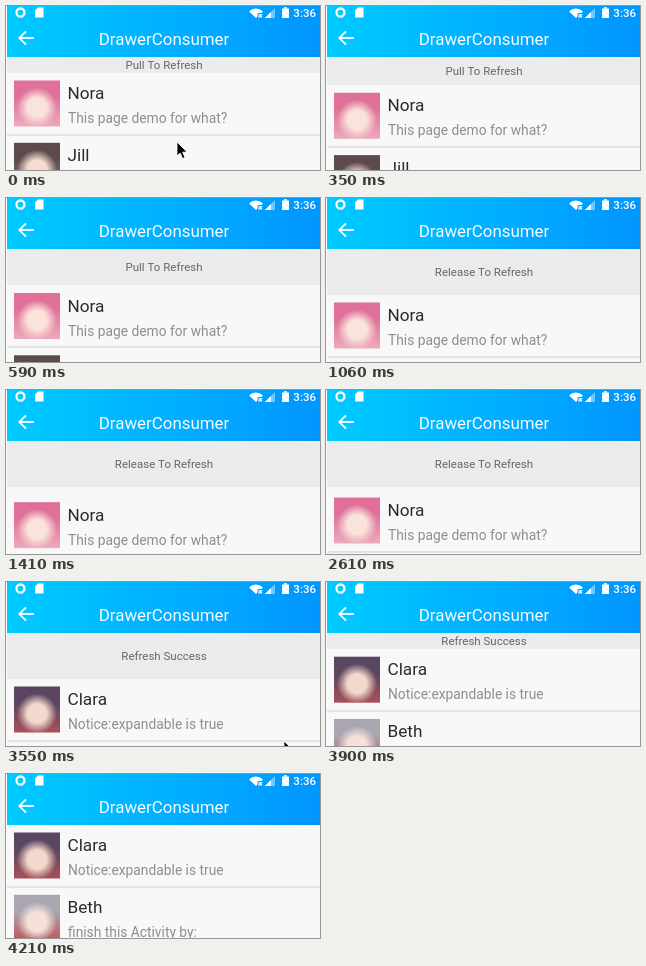
Recreate the animation shown at these times as an HTML page with a canvas. Size 314 px wide and 164 px high, loop 4.31 s.

```html
<!DOCTYPE html>
<html lang="en">
<head>
<meta charset="utf-8">
<title>Pull to refresh</title>
<style>
html, body { margin: 0; width: 100%; height: 100%; overflow: hidden; background: #fff; }
canvas { display: block; width: 314px; height: 164px; }
</style>
</head>
<body>
<canvas id="stage"></canvas>
<script>
const W = 314, H = 164, LOOP = 4310, TICK = 118.3;
const BAR = 51, HEAD = 46, PITCH = 62.3;
const FONT = 'Roboto, "Noto Sans", sans-serif';

// Moments of the gesture, in ticks
const SLOW = 5, ARMED = 9, HELD = 15, RELEASED = 22, SETTLED = 23, DONE = 30, CLOSED = 35;

const canvas = document.getElementById('stage');
const c = canvas.getContext('2d');
const ratio = window.devicePixelRatio || 1;
canvas.width = W * ratio;
canvas.height = H * ratio;

const before = [
  { name: 'Nora', note: 'This page demo for what?', tones: ['#e0709a', '#ecaabc', '#fae3da'] },
  { name: 'Jill', note: 'Pull down to see more', tones: ['#5c4a4c', '#8d7c80', '#f6ddd0'] }
];
const after = [
  { name: 'Clara', note: 'Notice:expandable is true', tones: ['#5a4660', '#a8505a', '#f3d9cc'] },
  { name: 'Beth', note: 'finish this Activity by:', tones: ['#a9a6b1', '#c0555a', '#f5e0da'] }
];

const ramp = (n, from, to, a, b) => a + (b - a) * (n - from) / (to - from);
const smooth = u => u * u * (3 - 2 * u);

// How far the list sits below the title bar
function pull(n) {
  if (n < SLOW) return ramp(n, 0, SLOW, 16, 36.5);
  if (n < ARMED) return ramp(n, SLOW, ARMED, 36.5, HEAD);
  if (n < RELEASED) return ramp(Math.min(n, HELD), ARMED, HELD, HEAD, 69);
  if (n < SETTLED) return HEAD + 3;
  if (n < DONE) return HEAD;
  return HEAD * (1 - smooth(Math.min(1, ramp(n, DONE, CLOSED, 0, 1))));
}

function label(n) {
  if (n >= DONE) return 'Refresh Success';
  if (n >= SETTLED) return 'Refreshing';
  return n >= ARMED ? 'Release To Refresh' : 'Pull To Refresh';
}

function text(str, x, y, size, color, align = 'left', weight = 400) {
  c.font = `${weight} ${size}px ${FONT}`;
  c.fillStyle = color;
  c.textAlign = align;
  c.fillText(str, x, y);
}

function rect(x, y, w, h, color) {
  c.fillStyle = color;
  c.fillRect(x, y, w, h);
}

function trace(points) {
  c.beginPath();
  points.forEach(([x, y]) => c.lineTo(x, y));
}

function poly(points, color) {
  trace(points);
  c.closePath();
  c.fillStyle = color;
  c.fill();
}

function line(points, width, color) {
  trace(points);
  c.lineWidth = width;
  c.strokeStyle = color;
  c.stroke();
}

function avatar(x, y, [top, bottom, mid]) {
  const base = c.createLinearGradient(0, y, 0, y + 46);
  base.addColorStop(0.35, top);
  base.addColorStop(1, bottom);
  rect(x, y, 46, 46, base);
  const glow = c.createRadialGradient(x + 23, y + 27, 5, x + 23, y + 27, 20);
  glow.addColorStop(0.3, mid);
  glow.addColorStop(1, mid + '00');
  rect(x, y, 46, 46, glow);
}

function row(item, y) {
  avatar(8, y + 7.5, item.tones);
  text(item.name, 61.5, y + 26, 17.2, '#2b2b2b');
  text(item.note, 62, y + 50, 13.8, '#8e8e8e');
  rect(1, Math.floor(y + 61), W, 2, '#e3e3e3');
}

function spinner(x, y, turn) {
  for (let i = 0; i < 12; i++) {
    const a = (i + turn) * Math.PI / 6;
    const at = r => [x + Math.cos(a) * r, y + Math.sin(a) * r];
    line([at(3.2), at(6.3)], 1.2, `rgba(90,90,90,${0.15 + i * 0.065})`);
  }
}

function cursor(x, y) {
  const shape = [[0, 0], [0, 14], [3.2, 11], [5.6, 16.5], [8, 15.5], [5.6, 10.2], [10, 10]];
  poly(shape.map(([dx, dy]) => [x + dx, y + dy]), '#000');
  c.lineWidth = 0.8;
  c.strokeStyle = '#fff';
  c.stroke();
}

function statusIcons() {
  c.beginPath();
  c.arc(14.5, 6.5, 4, 0, 7);
  c.lineWidth = 2.3;
  c.strokeStyle = '#fff';
  c.stroke();
  poly([[32, 1.5], [37.5, 1.5], [37.5, 11.5], [29, 11.5], [29, 4.5]], '#fff');

  c.beginPath();
  c.moveTo(250, 12);
  c.arc(250, 12, 9.5, -Math.PI * 0.76, -Math.PI * 0.24);
  c.fillStyle = '#fff';
  c.fill();
  rect(251.5, 7, 6, 6, '#03a0ff');
  line([[252.5, 8], [256, 11.5]], 1.1, '#fff');
  line([[256, 8], [252.5, 11.5]], 1.1, '#fff');

  poly([[269, 2], [269, 12], [259, 12]], 'rgba(255,255,255,0.45)');
  poly([[265, 6], [265, 12], [259, 12]], '#fff');
  rect(276, 2.5, 7, 9.5, '#fff');
  rect(278, 1.2, 3, 1.5, '#fff');
  text('3:36', 310, 11.3, 11.5, '#fff', 'right', 500);
}

function titleBar() {
  const blue = c.createLinearGradient(0, 0, W, 0);
  blue.addColorStop(0, '#00cbff');
  blue.addColorStop(1, '#0096ff');
  rect(1, 0, W, BAR, blue);
  statusIcons();
  line([[28, 32], [13.5, 32]], 1.8, '#fff');
  line([[20, 25.3], [13.3, 32], [20, 38.7]], 1.8, '#fff');
  text('DrawerConsumer', 158, 39, 16.9, '#f4fbff', 'center');
}

function header(n, height) {
  c.save();
  c.beginPath();
  c.rect(1, BAR, W, height);
  c.clip();
  rect(1, BAR, W, height, '#ebebeb');
  text(label(n), 158, Math.round(BAR + height / 2 + 4.2), 11.5, '#666', 'center');
  if (n >= SETTLED && n < DONE) spinner(89.5, 74, n * 2);
  c.restore();
}

function draw(now) {
  const n = Math.floor((now % LOOP + 6) / TICK);
  const offset = pull(n);

  c.setTransform(ratio, 0, 0, ratio, 0, 0);
  rect(0, 0, W, H, '#fff');
  rect(1, BAR, W, H, '#f8f8f8');
  header(n, Math.min(offset, HEAD));
  const rows = n < DONE ? before : after;
  rows.forEach((item, i) => row(item, BAR + offset + i * PITCH));
  titleBar();

  if (n < SLOW) cursor(171, 136 + (offset - 16) * 2.2);
  if (n === DONE) cursor(278, 159);
}

function loop() {
  draw(performance.now());
  requestAnimationFrame(loop);
}
loop();
</script>
</body>
</html>
```
